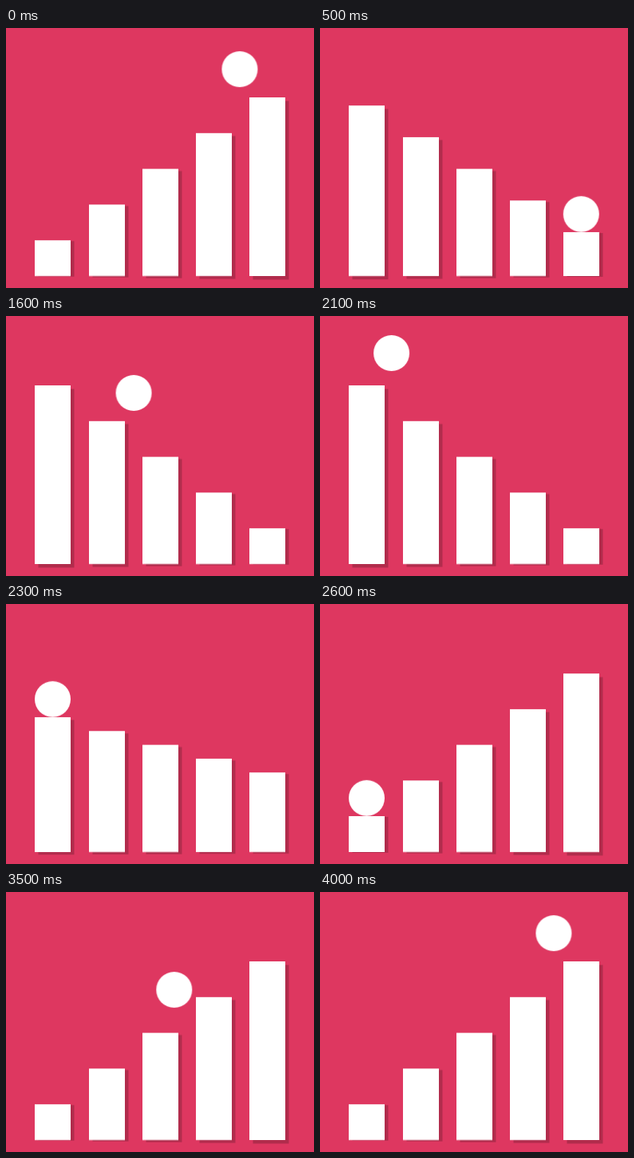
Write an HTML page that moves like this. It is 386 px wide and 326 px high and loops after 4100 ms.

```html
<!DOCTYPE html>
<html lang="en">
<head>
<meta charset="utf-8">
<title>Bouncing ball on bars</title>
<style>
  html, body { margin: 0; width: 100%; height: 100%; overflow: hidden; background: #de3760; }
  /* 1em is one design unit */
  .loader {
    --t: 1382;
    position: absolute; left: 36.4px; top: 87px;
    width: 70em; height: 50em; font-size: 4.48px;
  }
  .bar, .ball {
    position: absolute; width: 10em; background: #fff;
    animation: 4s ease calc(var(--t) * -1ms) infinite paused;
  }
  .bar {
    left: calc(var(--i) * 15em); bottom: 0; height: 50em;
    --up: calc(.2 + .2 * var(--i));
    --down: calc(1 - .2 * var(--i));
    transform-origin: 50% 100%;
    box-shadow: 1em 1em 0 rgba(0, 0, 0, .2);
    animation-name: flip;
  }
  .ball { left: 0; bottom: 10em; height: 10em; border-radius: 50%; animation-name: bounce; }

  @keyframes flip {
    0%, 40%, 100% { transform: scale(1, var(--up)); }
    50%, 90% { transform: scale(1, var(--down)); }
  }
  @keyframes bounce {
    0%, 100% { transform: translate(0, 0); }
    5% { transform: translate(8em, -14em); }
    10% { transform: translate(15em, -10em); }
    17% { transform: translate(23em, -24em); }
    20% { transform: translate(30em, -20em); }
    27% { transform: translate(38em, -34em); }
    30% { transform: translate(45em, -30em); }
    37% { transform: translate(53em, -44em); }
    40% { transform: translate(60em, -40em); }
    50% { transform: translate(60em, 0); }
    57% { transform: translate(53em, -14em); }
    60% { transform: translate(45em, -10em); }
    67% { transform: translate(37em, -24em); }
    70% { transform: translate(30em, -20em); }
    77% { transform: translate(22em, -34em); }
    80% { transform: translate(15em, -30em); }
    87% { transform: translate(7em, -44em); }
    90% { transform: translate(0, -40em); }
  }
</style>
</head>
<body>
<div class="loader">
  <div class="bar" style="--i:0"></div>
  <div class="bar" style="--i:1"></div>
  <div class="bar" style="--i:2"></div>
  <div class="bar" style="--i:3"></div>
  <div class="bar" style="--i:4"></div>
  <div class="ball"></div>
</div>
<script>
  const LOOP = 4100, STEP = 100, PHASE = 1382;
  const loader = document.querySelector('.loader');

  // Ten poses a second; the loop holds one step longer than the 4 s cycle.
  function draw() {
    const t = performance.now() % LOOP;
    loader.style.setProperty('--t', PHASE + Math.floor(t / STEP) * STEP);
    requestAnimationFrame(draw);
  }
  draw();
</script>
</body>
</html>
```
